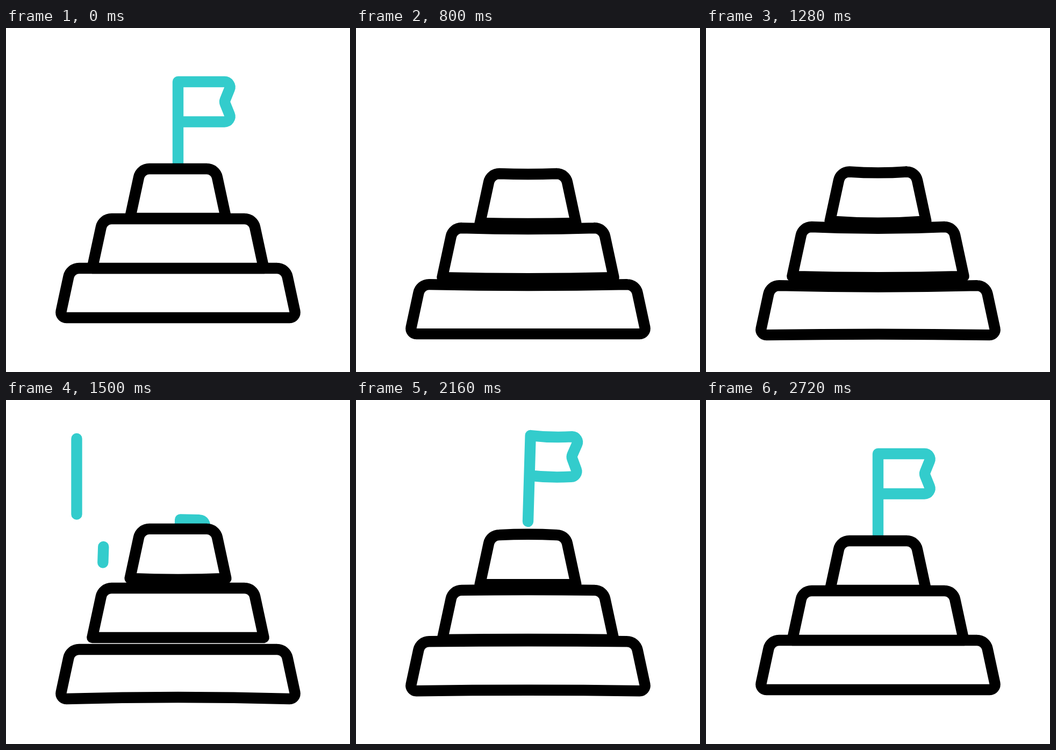
Write an HTML page with a canvas that moves like this. It is 640 by 640 pixels and loops after 3.24 s.

```html
<!DOCTYPE html>
<html lang="en">
<head>
<meta charset="utf-8">
<title>Summit flag</title>
<style>
  html, body { margin: 0; width: 100%; height: 100%; overflow: hidden; background: #fff; }
  canvas { display: block; width: 640px; height: 640px; }
</style>
</head>
<body>
<canvas id="stage" width="640" height="640"></canvas>
<script>
const ctx = document.getElementById('stage').getContext('2d');
const LOOP = 3240, INK = '#000', TEAL = '#33cccc';

// Rows are [time, ...values], joined by smooth curves without overshoot.
// Vertical offsets of the top, middle and bottom steps.
const SHIFT = [
  [200, 0, 0, 0], [500, 1, 2, 3], [720, 4, 8, 14], [800, 9, 17, 30],
  [1060, 24, 31, 49], [1110, 24, 31, 52], [1260, 8, 17, 34], [1500, -22, -5, 17],
  [1700, -34, -10, 12], [1900, -29, -7, 8], [2200, -8, 0, 2], [2340, 2, 5, 12],
  [2400, 8, 12, 22], [2480, 13, 18, 30], [2720, 0, 0, 0]
];
// Bow of the upper and lower edge of each step.
const BOW = [
  [500, 0, 0, 0, 0, 0, 0], [800, 1, 1, 2, 2, 2, 0], [1060, 3, 4, 5, 4, 4, 0],
  [1500, 0, 2, 0, 0, 0, -3], [1900, -3, 0, -2, -2, -2, -3], [2400, 0, 0, 0, 0, 0, 0]
];
// Flag: drop, tilt in degrees, width, sag.
const FLAG = [
  [200, 0, 0, 1, 0], [480, 8, 0, 0.97, 0], [640, 40, 0, 0.8, 0], [720, 89, 0, 0.6, 0],
  [800, 178, 0, 0.45, 0], [1400, 200, 0, 0.45, 0], [1500, 123, 1.5, 0.5, 0],
  [1700, 2, 8, 0.56, 0], [1900, -45, 10.4, 0.647, 0], [2250, -28, 0, 0.97, 2],
  [2400, -12, 0, 1, 2], [2500, 6, 0, 1, 1], [2720, 0, 0, 1, 0]
];

// Steps: left base x, top y, radius of the lower corners.
const STEPS = [[230.6, 262, 0], [160.4, 355, 0], [100, 447, 10]];
const STEP_HEIGHT = 92, STEP_LEAN = 19.8;

const STREAKS = [
  { line: [131.5, 72, 131.5, 258], tail: [1540, 1905] },
  { line: [181.3, 273, 180, 312], tail: [1540, 1780] }
];
const RAYS = [
  [423.5, 58, 434.5, 26],
  [450, 93, 498, 60],
  [472, 131.5, 504, 135.5]
];

const clamp = v => Math.min(1, Math.max(0, v));
const progress = (t, from, to) => clamp((t - from) / (to - from));
const easeOut = p => 1 - (1 - p) ** 2;

function slopeAt(rows, i, k) {
  if (i <= 0 || i >= rows.length - 1) return 0;
  const rate = j => (rows[j + 1][k] - rows[j][k]) / (rows[j + 1][0] - rows[j][0]);
  const a = rate(i - 1), b = rate(i);
  return a * b > 0 ? 2 * a * b / (a + b) : 0;
}

function sample(rows, t) {
  const last = rows.length - 1;
  if (t <= rows[0][0]) return rows[0].slice(1);
  if (t >= rows[last][0]) return rows[last].slice(1);
  const i = rows.findIndex(row => row[0] > t) - 1;
  const p = rows[i], q = rows[i + 1], h = q[0] - p[0], u = (t - p[0]) / h;
  const v = 1 - u;
  return p.slice(1).map((value, n) => {
    const k = n + 1;
    return value * v * v * (1 + 2 * u) + q[k] * u * u * (3 - 2 * u)
      + h * u * v * (slopeAt(rows, i, k) * v - slopeAt(rows, i + 1, k) * u);
  });
}

function drawStep([left, top, radius], dy, bowTop, bowBottom) {
  const right = 640 - left, y0 = top + dy, y1 = y0 + STEP_HEIGHT;
  const l = left + STEP_LEAN, r = right - STEP_LEAN, inset = radius * 1.24;
  ctx.beginPath();
  ctx.moveTo(left + STEP_LEAN / 2, (y0 + y1) / 2);
  ctx.arcTo(l, y0, 320, y0, 20);
  ctx.quadraticCurveTo(320, y0 + 2 * bowTop, r - 16, y0);
  ctx.arcTo(r, y0, right, y1, 20);
  if (radius) ctx.arcTo(right, y1, 320, y1, radius);
  else ctx.lineTo(right, y1);
  ctx.quadraticCurveTo(320, y1 + 2 * bowBottom, left + inset, y1);
  if (radius) ctx.arcTo(left, y1, l, y0, radius);
  ctx.closePath();
  ctx.fill();
  ctx.stroke();
}

function drawFlag(t) {
  if (t > 795 && t < 1430) return;
  const [drop, tilt, width, sag] = sample(FLAG, t);
  const tip = 101.3 * width, top = -160, bottom = -85.5, middle = (top + bottom) / 2;
  const notch = tip - 15, edge = tip - 15.3;
  ctx.save();
  ctx.translate(320, 260 + drop);
  ctx.rotate(tilt * Math.PI / 180);
  ctx.beginPath();
  ctx.moveTo(0, 0);
  ctx.lineTo(0, top);
  ctx.quadraticCurveTo(edge / 2, top + 2 * sag, edge, top);
  ctx.arcTo(tip, top, notch, middle, 10);
  ctx.arcTo(notch, middle, tip, bottom, 10);
  ctx.arcTo(tip, bottom, 0, bottom, 10);
  ctx.lineTo(edge, bottom);
  ctx.quadraticCurveTo(edge / 2, bottom + 2 * sag, 0, bottom);
  ctx.stroke();
  ctx.restore();
}

function drawTrim([x0, y0, x1, y1], from, to) {
  if (to - from < 0.0001) return;
  const x = p => x0 + (x1 - x0) * p, y = p => y0 + (y1 - y0) * p;
  ctx.beginPath();
  ctx.moveTo(x(from), y(from));
  ctx.lineTo(x(to), y(to));
  ctx.stroke();
}

function draw(t) {
  ctx.fillStyle = '#fff';
  ctx.fillRect(0, 0, 640, 640);
  ctx.lineWidth = 20.4;
  ctx.lineCap = ctx.lineJoin = 'round';

  ctx.strokeStyle = TEAL;
  drawFlag(t);
  for (const { line, tail } of STREAKS)
    drawTrim(line, easeOut(progress(t, ...tail)), progress(t, 1380, 1540));
  for (const ray of RAYS)
    drawTrim(ray, progress(t, 2430, 2590), progress(t, 2340, 2455));

  ctx.strokeStyle = INK;
  const shift = sample(SHIFT, t), bow = sample(BOW, t);
  for (let i = 2; i >= 0; i--)
    drawStep(STEPS[i], shift[i], bow[2 * i], bow[2 * i + 1]);
}

const start = performance.now();
function tick() {
  draw((performance.now() - start) % LOOP);
  requestAnimationFrame(tick);
}
tick();
</script>
</body>
</html>
```
